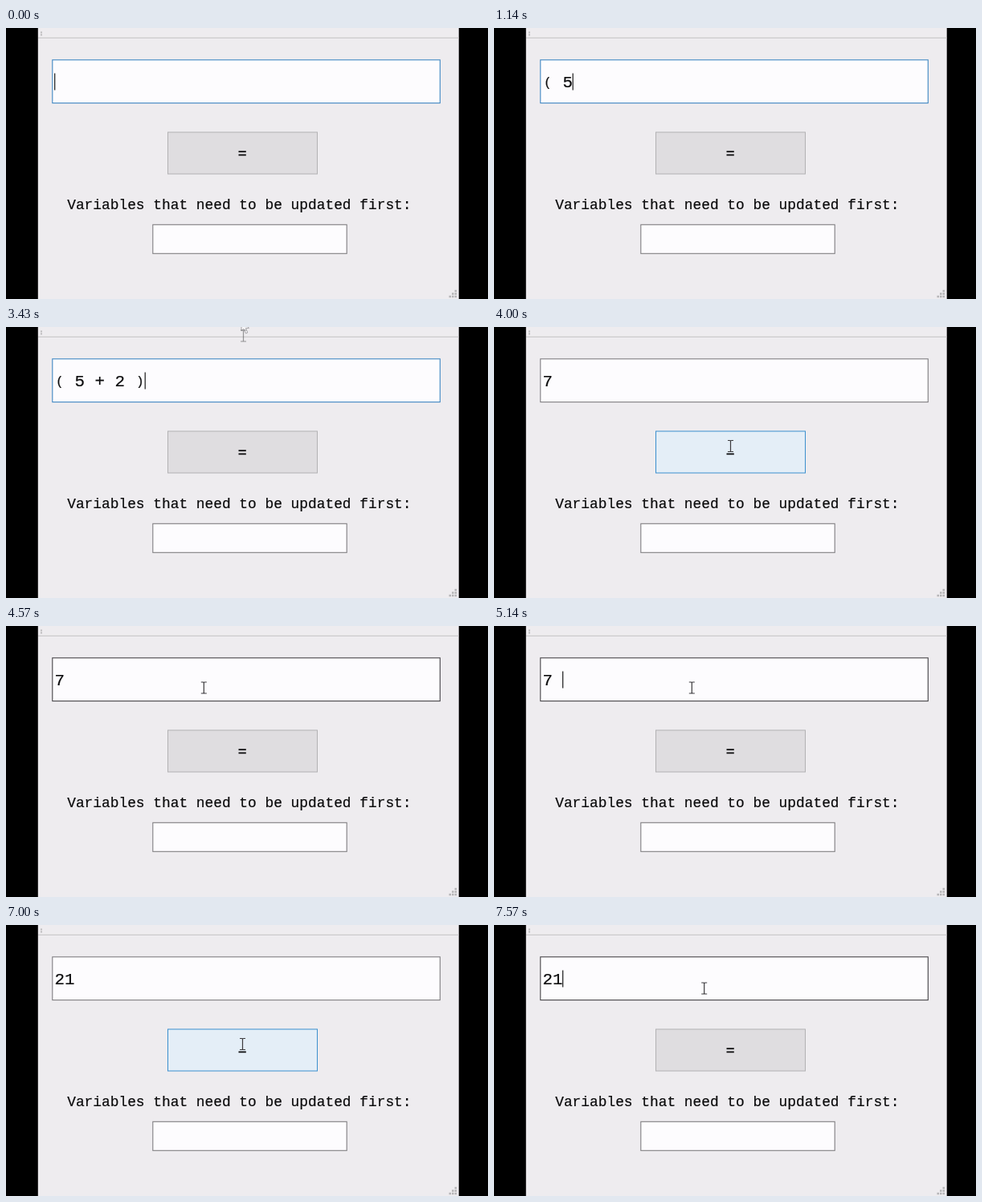
Animation, 600 px wide and 338 px high, one loop 8 s. Source, as an HTML page:

```html
<!DOCTYPE html>
<html lang="en">
<head>
<meta charset="utf-8">
<title>Calculator</title>
<style>
  html, body { margin: 0; width: 100%; height: 100%; overflow: hidden; background: #000; }
  svg { display: block; width: 100%; height: 100%; }
  text { font-family: "Liberation Mono", monospace; fill: #0b0b0c; stroke: #0b0b0c; stroke-width: .2px; white-space: pre; }
  .label { font-size: 17.85px; }
  #entryText { font-size: 20.8px; text-anchor: middle; }
  .paren { font-size: 16px; }
  .star { font-size: 25px; }
  .box { fill: #fdfcfe; stroke: #7f7e81; stroke-width: 1.1; }
  #entry.focus { stroke: #3f88c2; }
  #entry.over { stroke: #454447; }
  #button rect { fill: #dfdde0; stroke: #b2b1b3; }
  #button.hover rect { fill: #e4eef7; stroke: #3a8fce; }
  #button path { stroke: #0b0b0c; stroke-width: 1.8; }
  #button.hover .upper { display: none; }
  #beam { fill: none; stroke: #3c3b3e; stroke-width: 1.2; }
</style>
</head>
<body>
<svg viewBox="0 0 600 338">
  <rect width="600" height="338"/>
  <rect x="39.8" width="523.9" height="338" fill="#eeecef"/>
  <path d="M40 12.3H563.7" stroke="#c3c2c4"/>
  <path d="M44 4.5v2M44 7.5v2" stroke="#a9a8aa" stroke-width="1.4"/>
  <path d="M558.5 328h2.5M555 331.5h2.5M558.5 331.5h2.5M551.5 335h2.5M555 335h2.5M558.5 335h2.5" stroke="#b5b4b6" stroke-width="2.4"/>

  <rect id="entry" class="box" x="57.8" y="39.8" width="482.5" height="53.8"/>
  <text id="entryText"></text>
  <path id="caret" d="M.5 56.5V77.5" stroke="#19191a" stroke-width="1.2"/>

  <g id="button">
    <rect x="201.5" y="130" width="186" height="52"/>
    <path class="upper" d="M289.5 154.2h9.3"/>
    <path d="M289.5 158.4h9.3"/>
  </g>

  <text class="label" x="76.2" y="225.8">Variables that need to be updated first:</text>
  <rect class="box" x="182.8" y="245.3" width="241.4" height="36"/>

  <path id="arrow" d="M293 -9V5L296 2.4L298.5 8L300.8 7L298.4 1.4H302.5Z" fill="#f6f5f7" stroke="#a5a4a7"/>
  <path id="beam" d="M-3.5 -7H-1Q0 -7 0 -6Q0 -7 1 -7H3.5M0 -6V6M-3.5 7H-1Q0 7 0 6Q0 7 1 7H3.5"/>
</svg>
<script>
  const $ = id => document.getElementById(id);
  const LOOP = 8000, TICKS_PER_MS = 7 / 1000, CELL = 12.5, LEFT = 60.5;

  const rounds = [
    { start: 0, focus: 0, base: "", keys: "( 5 + 2 )", typeAt: 2, pace: 2.6 },
    { start: 27, focus: 33, base: "7", keys: " * 3", typeAt: 35, pace: 3 },
    { start: 48, focus: 52, base: "21", keys: "", typeAt: 56, pace: 1 }
  ];

  const equals = { x: 294.5, y: 148.5 };
  const enter = { x: 295.5, y: 11 };
  const moves = [
    { from: 24, until: 26, to: equals },
    { from: 29, until: 32, to: { x: 246.3, y: 77 } },
    { from: 43, until: 45, to: { x: 259, y: 109 } },
    { from: 45, until: 47, to: equals },
    { from: 49, until: 52, to: { x: 261.7, y: 79 } }
  ];

  const clamp = (v, min, max) => Math.min(max, Math.max(min, v));
  const ease = p => p * p * (3 - 2 * p);

  function pointerAt(tick) {
    return moves.reduce((p, { from, until, to }) => {
      const k = ease(clamp((tick - from) / (until - from), 0, 1));
      return { x: p.x + (to.x - p.x) * k, y: p.y + (to.y - p.y) * k };
    }, enter);
  }

  function typed({ base, keys, typeAt, pace }, tick) {
    const count = clamp(Math.floor((tick - typeAt) / pace + 1.001), 0, keys.length);
    return base + keys.slice(0, count);
  }

  function glyph(char, i) {
    const kind = "()".includes(char) ? "paren" : char === "*" ? "star" : "";
    const y = { paren: 72.6, star: 78.5 }[kind] || 74;
    return `<tspan class="${kind}" x="${LEFT + (i + .5) * CELL}" y="${y}">${char}</tspan>`;
  }

  const show = (id, visible) => $(id).style.display = visible ? "" : "none";

  function draw(now) {
    const tick = Math.floor((now % LOOP + 5) * TICKS_PER_MS);
    const round = rounds.findLast(r => r.start <= tick);
    const text = typed(round, tick);
    const pointer = pointerAt(tick);
    const hover = pointer.y > 125;
    const over = pointer.y > 35 && !hover;
    const focused = tick >= round.focus && !hover;

    $("entryText").innerHTML = [...text].map(glyph).join("");
    $("caret").setAttribute("transform", `translate(${LEFT - .3 + text.length * CELL})`);
    show("caret", focused);
    $("entry").setAttribute("class", "box " + (over ? "over" : focused ? "focus" : ""));
    $("button").setAttribute("class", hover ? "hover" : "");

    const entering = tick === moves[0].from;
    $("beam").setAttribute("transform", `translate(${pointer.x} ${pointer.y})`);
    $("beam").style.opacity = entering ? .5 : 1;
    show("beam", tick >= moves[0].from);
    show("arrow", entering);
    requestAnimationFrame(draw);
  }
  draw(0);
</script>
</body>
</html>
```
